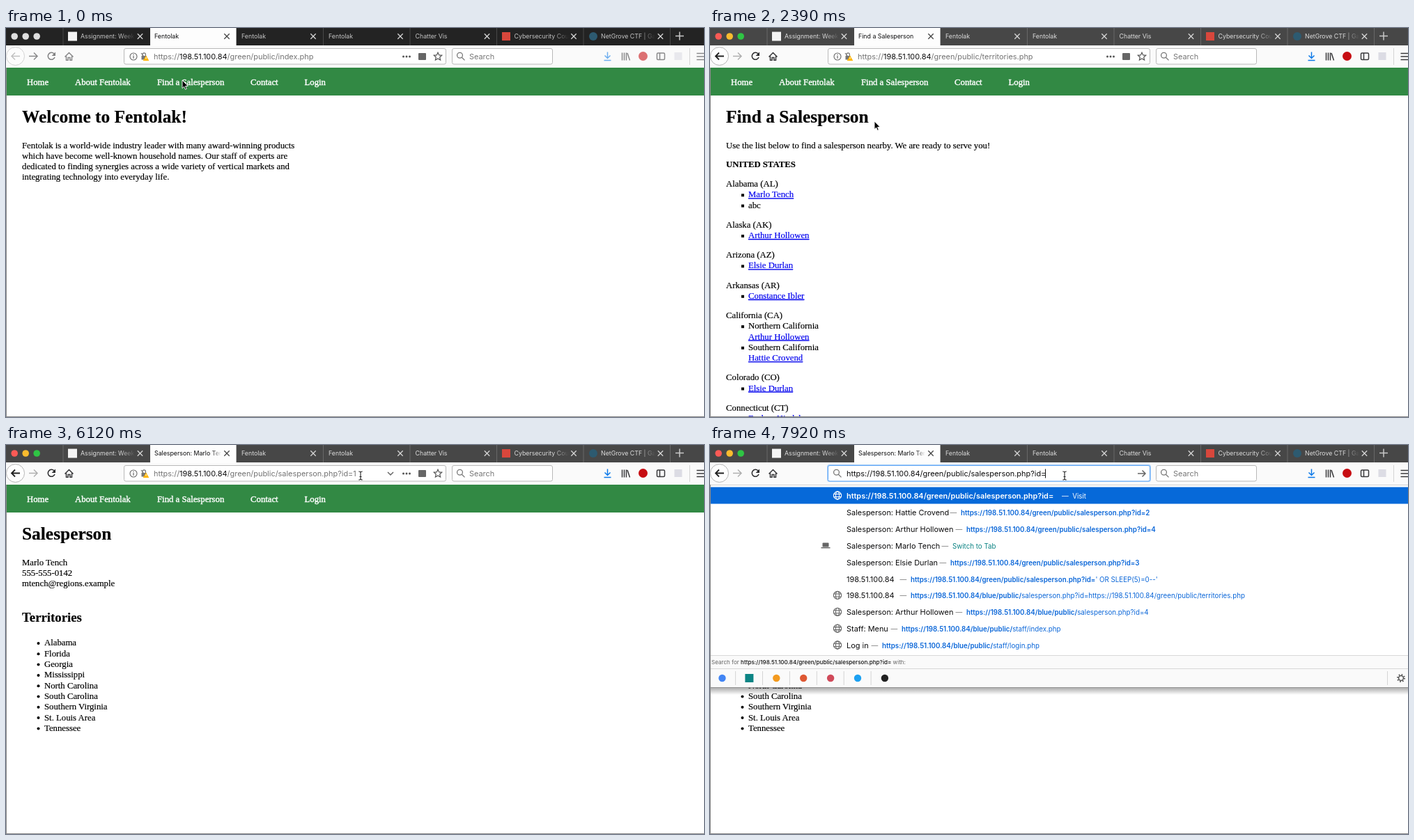
Animation, 1002 px wide and 559 px high, one loop 8000 ms. Source, as an HTML page:

```html
<!DOCTYPE html>
<html lang="en">
<head>
<meta charset="utf-8">
<title>Browser session</title>
<style>
  html, body { margin: 0; width: 100%; height: 100%; overflow: hidden; background: #fff; }
  #stage { display: block; --bar: #474747; --sep: #686868; --tab: #dcdcdc; --path: #737373; }
  #stage.idle { --bar: #232323; --sep: #484848; --tab: #c4c4c4; }
  #stage.focus { --path: #0c0c0d; }
  #stage.idle .tools { opacity: .58; }
  text { white-space: pre; }
  .ui { font-family: Inter, Roboto, sans-serif; }
  .tab { font-size: 8.8px; fill: var(--tab); }
  .on { fill: #0c0c0d; }
  .url { font-size: 10.93px; fill: var(--path); }
  .host { fill: #0c0c0d; }
  .page { font: 12.75px "Liberation Serif", "Times New Roman", serif; }
  .page text { color: #000; fill: currentColor; stroke: currentColor; stroke-width: .18; }
  .page .h1 { font-size: 25.4px; font-weight: bold; }
  .page .h2 { font-size: 18.8px; font-weight: bold; }
  .page .link { color: #00e; text-decoration: underline; }
  .page .nav { color: #fff; stroke-width: .4; }
  .line { fill: none; stroke: #3a3a3c; stroke-width: 1.5; }
  .hit { font-size: 9.75px; fill: #0a66d8; }
  .b { font-weight: 600; }
  .fade stop { stop-color: var(--bar); }
</style>
</head>
<body>
<svg id="stage" width="1002" height="559" viewBox="0 0 1002 559"></svg>
<script>
const LOOP = 8000, STEP = 150;
const ACTIVE = 150, CLICK1 = 1340, LIST = 1790, CLICK2 = 3590, PERSON = 4040,
      HOVER = 5970, FOCUS = 6570, CARET = 7020, PLAIN = 7170, TYPED = 7770;

const BRAND = 'Fentolak', IP = '198.51.100.84';
const SELLER = 'Marlo Tench', SECOND = 'Arthur Hollowen', THIRD = 'Elsie Durlan', FOURTH = 'Hattie Crovend';
const GREEN = `https://${IP}/green/public/`, BLUE = `https://${IP}/blue/public/`;
const QUERY = GREEN + 'salesperson.php?id=';

const text = (x, y, s, cls = '', more = '') => `<text x="${x}" y="${y}" class="${cls}" ${more}>${s}</text>`;
const rect = (x, y, w, h, fill, more = '') => `<rect x="${x}" y="${y}" width="${w}" height="${h}" fill="${fill}" ${more}/>`;
const dot = (x, y, r, fill, more = '') => `<circle cx="${x}" cy="${y}" r="${r}" fill="${fill}" ${more}/>`;
const line = (d, more = '') => `<path d="${d}" class="line" ${more}/>`;
// Shown only while the time lies in one of the [from, to) pairs.
const during = (spans, s) => `<g data-t="${spans}">${s}</g>`;

/* Tab strip */
const cross = (x, color) => line(`M${x - 3.7} 8.3l7.4 7.4m0-7.4l-7.4 7.4`, `style="stroke:${color};stroke-width:1.3"`);
const clipped = (x, w, s) => `<svg x="${x}" y="0" width="${w}" height="25">${s}</svg>`;

function plainTab(x, title, icon) {
  const pad = icon ? 25 : 7.5;
  return clipped(x, 103, text(pad, 15.2, title, 'tab') + rect(82, 0, 21, 25, 'url(#fade)')) +
    rect(x - .5, 0, 1, 25, 'var(--sep)') + (icon || '') + cross(x + 110.5, '#d5d5d5');
}

function liveTab() {
  const title = (x, s) => clipped(207, 102, text(x - 207, 15.2, s, 'tab on') + rect(88, 0, 14, 25, 'url(#fadeOn)'));
  return rect(207, 0, 123.5, 26, '#fdfdfd') +
    during([0, CLICK1], title(213, BRAND)) +
    during([CLICK1, LIST], title(231, BRAND)) +
    during([LIST, CLICK2], title(213, 'Find a Salesperson')) +
    during([CLICK2, PERSON], title(231, 'Find a Salesperson')) +
    during([PERSON, LOOP], title(213, 'Salesperson: ' + SELLER)) +
    during([CLICK1, LIST, CLICK2, PERSON], dot(215, 12, 1.6, '#666', 'id="busy"')) +
    cross(317, '#444');
}

function tabStrip() {
  const lights = colors => colors.map((c, i) => dot(12.2 + 16 * i, 12, 4.8, c)).join('');
  return rect(0, 0, 1002, 25, 'var(--bar)') +
    during([0, ACTIVE], lights(['#dedede', '#dedede', '#dedede'])) +
    during([ACTIVE, LOOP], lights(['#fb5a55', '#f9bb2e', '#2fc544'])) +
    plainTab(82, 'Assignment: Week 10', rect(89, 5.5, 13, 13, '#f4f4f4')) +
    plainTab(330.5, BRAND) + plainTab(455.5, BRAND) + plainTab(580, 'Chatter Vis') +
    plainTab(704.5, 'Cybersecurity Course', rect(712, 6, 12, 12, '#d8473c')) +
    plainTab(829, 'NetGrove CTF | Games', dot(843, 12, 6, '#2d5a70')) +
    rect(953, 0, 1, 25, 'var(--sep)') +
    line('M961 11.5h12m-6-6v12', 'style="stroke:#c8c8c8"') + liveTab();
}

/* Toolbar */
const arrowLeft = 'M20 40.5H8m5-5l-5 5 5 5', arrowRight = 'M33 40.5h12m-5-5l5 5-5 5';
const grey = c => `style="stroke:${c}"`;

function reload() {
  const shape = c => line('M69 37a5 5 0 1 0 1 5', grey(c)) + `<path d="M71 34.6v5.4h-5.4z" fill="${c}"/>`;
  return during([0, 1490, 2390, 3740, 4630, LOOP], shape('#2b2b2d')) +
    during([1490, LIST, 3740, PERSON], line('M60.5 36l9 9m0-9l-9 9')) +
    during([LIST, 2390, PERSON, 4630], shape('#b4b4b4'));
}

function navTools() {
  return '<g class="tools">' +
    dot(13.5, 40.5, 13, '#fefefe', 'stroke="#b5b5b5"') +
    during([0, ACTIVE], line(arrowLeft, grey('#999')) + line(arrowRight)) +
    during([ACTIVE, LOOP], line(arrowLeft, 'style="stroke:#222;stroke-width:1.8"') + line(arrowRight, grey('#b0b0b0'))) +
    reload() + line('M84.5 41.5l6-6 6 6M86.5 40.5V46.3h2.6V42.5h2.8v3.8h2.6v-5.8') +
    line('M863.5 34.5v9m-4-4l4 4 4-4m-9 7h10', grey('#0a78e8')) +
    line('M884.5 35.5v11m3-11v11m3-11v11m1.5-10.5l3.5 10.5') +
    dot(914.5, 40.5, 6.5, '#c70d12') +
    '<rect x="934.5" y="36" width="11" height="9.5" rx="1.5" class="line"/>' + line('M938.5 36v9.5') +
    rect(959.5, 35, 11, 11, '#dcdce4') + line('M991.5 36.5h11m-11 4.5h11m-11 4.5h11') +
    '</g>' + rect(981, 29, 1, 24, '#d4d4d4');
}

const lens = x => `<g fill="none" stroke="#777" stroke-width="1.3"><circle cx="${x - 1.5}" cy="39.3" r="3.9"/><path d="M${x + 1.3} 42.2l4.2 4.2"/></g>`;
const field = (x, w, stroke) => `<rect x="${x}" y="29.5" width="${w}" height="22.5" rx="2.5" fill="#fff" stroke="${stroke}"/>`;

function addressBar() {
  const url = file => text(212, 45, `https://<tspan class="host">${IP}</tspan>/green/public/${file}`, 'url');
  const site = `<circle cx="183" cy="41" r="5" class="line" style="stroke:#666;stroke-width:1.1"/>` +
    rect(182.4, 40, 1.2, 3.8, '#666') + rect(182.4, 37.8, 1.2, 1.3, '#666') +
    rect(194.5, 40, 7, 5.5, '#777') + line('M196 40v-2a2.2 2.2 0 0 1 4.4 0v2m-6.4-4l7 9', 'style="stroke:#777;stroke-width:1.2"') +
    '<path d="M201 39.5l4.3 7.6h-8.6z" fill="#ffb400"/>' + rect(200.5, 42, 1, 2.6, '#fff');
  const actions = [570.5, 575, 579.5].map(x => dot(x, 41, 1.5, '#555')).join('') +
    rect(592, 36, 11, 10, '#666', 'rx="1"') +
    line('M620 35.2l1.7 3.7 4 .4-3 2.7.9 4-3.6-2.1-3.6 2.1.9-4-3-2.7 4-.4z', 'style="stroke:#555;stroke-width:1.2"');
  return during([0, FOCUS], field(169.5, 462, '#b9b9b9')) +
    during([FOCUS, LOOP], rect(168, 28, 465, 25, '#a5cdfa', 'rx="3.5"') + field(169.5, 462, '#62a8f5')) +
    during([FOCUS, CARET], rect(212, 34.5, 291, 13.5, '#b3d6fd')) +
    during([0, TYPED], site + actions) +
    during([0, LIST], url('index.php')) +
    during([LIST, PERSON], url('territories.php')) +
    during([PERSON, TYPED], url('salesperson.php?id=1')) +
    during([HOVER, TYPED], line('M548 39l4 4 4-4', grey('#666'))) +
    during([CARET, PLAIN], rect(502, 35, 1, 13, '#111')) +
    during([TYPED, LOOP], lens(183) + text(196, 45, QUERY, 'url') + line('M614 41h11m-4.5-4.5l4.5 4.5-4.5 4.5', grey('#666'))) +
    during([7920, LOOP], rect(481, 34.5, 1, 13, '#111')) +
    field(640.5, 144, '#b9b9b9') + lens(653) + text(665, 45, 'Search', 'url', 'style="fill:#777"');
}

/* Web pages */
const rows = (x, y, list) => list.map((s, i) => text(x, y + 15.15 * i, s)).join('');

function home() {
  return text(23, 136, `Welcome to ${BRAND}!`, 'h1') + rows(23, 172.6, [
    BRAND + ' is a world-wide industry leader with many award-winning products',
    'which have become well-known household names. Our staff of experts are',
    'dedicated to finding synergies across a wide variety of vertical markets and',
    'integrating technology into everyday life.']);
}

// A leading "*" marks a bullet, "@" a link.
const TERRITORIES = [
  ['Alabama (AL)', '*@' + SELLER, '*abc'],
  ['Alaska (AK)', '*@' + SECOND],
  ['Arizona (AZ)', '*@' + THIRD],
  ['Arkansas (AR)', '*@Constance Ibler'],
  ['California (CA)', '*Northern California', '@' + SECOND, '*Southern California', '@' + FOURTH],
  ['Colorado (CO)', '*@' + THIRD],
  ['Connecticut (CT)', '*@Barlow Hindale']];

function territories() {
  let y = 228, out = text(23, 136, 'Find a Salesperson', 'h1') +
    text(23, 172.6, 'Use the list below to find a salesperson nearby. We are ready to serve you!') +
    text(23, 200.3, 'UNITED STATES', '', 'font-weight="bold"');
  for (const group of TERRITORIES) {
    group.forEach((s, i) => {
      if (s[0] === '*') out += rect(45, y - 5, 4, 4, '#000');
      out += text(i ? 55 : 23, y, s.replace(/^[*@]+/, ''), s.includes('@') ? 'link' : '');
      y += 15.3;
    });
    y += 12.8;
  }
  return out;
}

function person() {
  const areas = ['Alabama', 'Florida', 'Georgia', 'Mississippi', 'North Carolina', 'South Carolina',
    'Southern Virginia', 'St. Louis Area', 'Tennessee'];
  return text(23, 136, 'Salesperson', 'h1') +
    rows(23, 172.6, [SELLER, '555-555-0142', 'mtench@regions.example']) +
    text(23, 254.3, 'Territories', 'h2') +
    areas.map((s, i) => dot(46.5, 285 + 15.3 * i, 2, '#000') + text(55, 288.4 + 15.3 * i, s)).join('');
}

function pages() {
  const menu = [[30, 'Home'], [99, 'About ' + BRAND], [217, 'Find a Salesperson'], [351, 'Contact'], [428.5, 'Login']];
  return '<g class="page">' + rect(0, 57, 1002, 40, '#328944') +
    menu.map(([x, s]) => text(x, 82, s, 'nav')).join('') +
    during([0, LIST], home()) + during([LIST, PERSON], territories()) + during([PERSON, LOOP], person()) +
    '</g>' + rect(0, 57, 1, 502, '#8a8a8a') + rect(0, 558, 1002, 1, '#8a8a8a');
}

/* Address suggestions */
const globe = (y, c) => `<g fill="none" stroke="${c}" stroke-width="1.1"><circle cx="183" cy="${y}" r="5.6"/>` +
  `<ellipse cx="183" cy="${y}" rx="2.5" ry="5.6"/><path d="M177.6 ${y - 2}h10.8m-10.8 4h10.8"/></g>`;

function popup() {
  const hits = [
    ['Salesperson: ' + FOURTH, 360, QUERY + 2],
    ['Salesperson: ' + SECOND, 368, QUERY + 4],
    ['Salesperson: ' + SELLER, 348],
    ['Salesperson: ' + THIRD, 345, QUERY + 3],
    [IP, 288, QUERY, "' OR SLEEP(5)=0--'"],
    [IP, 288, BLUE, `salesperson.php?id=${GREEN}territories.php`],
    ['Salesperson: ' + SECOND, 368, BLUE, 'salesperson.php?id=4'],
    ['Staff: Menu', 275, BLUE, 'staff/index.php'],
    ['Log in', 247, BLUE, 'staff/login.php']];
  let out = rect(1, 348, 1001, 11, 'url(#shade)') + rect(1, 57, 1001, 291, '#fff') + rect(1, 57, 1001, 1, '#d0d0d0') +
    rect(1, 60.5, 1001, 24, '#0669d9') + globe(72.5, '#fff') +
    text(196, 77, QUERY, 'url b', 'style="fill:#fff"') + text(505, 77, '—  Visit', 'hit', 'style="fill:#fff"');
  hits.forEach(([title, x, match, rest = ''], i) => {
    const y = 101.2 + 23.85 * i;
    out += text(196, y, title, 'url') + text(x - 15.5, y, '—', 'hit', 'style="fill:#777"') +
      (match ? text(x, y, `<tspan class="b">${match}</tspan>${rest}`, 'hit')
             : text(x, y, 'Switch to Tab', 'hit', 'style="fill:#0b8383"') +
               rect(161.5, y - 8.5, 9, 6, '#666', 'rx="1"') + rect(159.5, y - 2, 13, 1.5, '#666'));
    if (i > 4) out += globe(y - 4.5, '#666');
  });
  out += rect(1, 302, 1001, 46, '#fafafa') + rect(1, 302, 1001, 1, '#d8d8d8') + rect(1, 321, 1001, 1, '#d8d8d8') +
    text(2, 315, `Search for <tspan fill="#111" font-weight="500">${QUERY}</tspan> with:`, '', 'font-size="8.1" fill="#666"');
  ['#4285f4', '#0c8484', '#f39a1e', '#de5833', '#d04a5a', '#1da1f2', '#222'].forEach((c, i) => {
    const x = 17.5 + 38.9 * i;
    out += i === 1 ? rect(x - 6, 329, 12, 12, c) : dot(x, 335, 5.2, c);
    if (i < 6) out += rect(x + 18.6, 325, 1, 20, '#d4d4d4');
  });
  return out + rect(972, 325, 1, 20, '#d4d4d4') +
    '<circle cx="992" cy="335" r="3.4" class="line" style="stroke:#555"/>' +
    '<circle cx="992" cy="335" r="5" class="line" style="stroke:#555;stroke-dasharray:1.6 2.33;stroke-width:2"/>' +
    rect(1, 348, 1001, 1, '#959595');
}

/* Pointer: time, x, y, shape */
const POINTER = [
  [0, 253, 75, 'arrow'], [150, 253, 76, 'hand'], [1940, 252, 80, 'hand'], [2090, 250, 93, 'hand'],
  [2240, 246, 112, 'arrow'], [2390, 236, 134, 'arrow'], [2540, 190, 180, 'arrow'], [2690, 136, 222, 'arrow'],
  [2840, 98, 248, 'arrow'], [2990, 90, 241, 'hand'], [4040, 92, 241, 'beam'], [4190, 98, 242, 'beam'],
  [4340, 124, 232, 'arrow'], [4490, 162, 214, 'arrow'], [4630, 188, 200, 'arrow'], [5080, 204, 190, 'arrow'],
  [5230, 238, 166, 'arrow'], [5380, 290, 132, 'arrow'], [5530, 352, 98, 'arrow'], [5670, 420, 70, 'arrow'],
  [5820, 472, 53, 'arrow'], [5970, 500, 46, 'beam'], [6120, 509, 44, 'beam']];

const SHAPES = {
  arrow: '<path d="M0 0V11.6L2.6 9.2 4.4 13.3 6.3 12.4 4.5 8.5H8.2Z" fill="#000" stroke="#fff" stroke-width=".9"/>',
  hand: '<path d="M-1.2 1q0-1.2 1.2-1.2t1.2 1.2V5q2-.6 2.4.4 2-.5 2.3.5 1.7-.2 1.8 1V10l-1.4 4H0L-3.4 8.8q-.6-1.4.6-1.6L-1.2 8.4Z" fill="#fff" stroke="#111"/>',
  beam: '<path d="M-2.7-6q2.7 0 2.7 1.5 0-1.5 2.7-1.5M0-5V5M-2.7 6q2.7 0 2.7-1.5 0 1.5 2.7 1.5M-1.5 1.5h3" fill="none" stroke="#222" stroke-width="1.1"/>'
};

const gradient = (id, cls, color, a, b, dir) => `<linearGradient id="${id}" class="${cls}" ${dir}>` +
  `<stop stop-color="${color}" stop-opacity="${a}"/><stop offset="1" stop-color="${color}" stop-opacity="${b}"/></linearGradient>`;

const stage = document.getElementById('stage');
stage.innerHTML = '<defs>' + gradient('fade', 'fade', '#474747', 0, 1, '') +
  gradient('fadeOn', '', '#fdfdfd', 0, 1, '') + gradient('shade', '', '#000', .35, 0, 'x2="0" y2="1"') + '</defs>' +
  rect(0, 0, 1002, 559, '#fff') + pages() +
  '<g class="ui">' + rect(0, 25, 1002, 32, '#fafafa') + tabStrip() + navTools() + addressBar() +
  during([TYPED, LOOP], popup()) + '</g>' +
  Object.entries(SHAPES).map(([k, s]) => `<g id="${k}">${s}</g>`).join('');

const timed = [...stage.querySelectorAll('[data-t]')].map(el => ({ el, at: el.dataset.t.split(',').map(Number) }));
const busy = document.getElementById('busy');
const pointers = Object.keys(SHAPES).map(k => document.getElementById(k));

function draw() {
  const t = performance.now() % LOOP;
  stage.classList.toggle('idle', t < ACTIVE);
  stage.classList.toggle('focus', t >= FOCUS);
  // The number of passed bounds is odd inside a span.
  for (const { el, at } of timed) el.style.display = at.filter(v => v <= t).length % 2 ? '' : 'none';
  const since = t - (t < CLICK2 ? CLICK1 : CLICK2);
  busy.setAttribute('cx', 215 + 4 * Math.max(0, Math.floor(since / STEP)));
  const [, x, y, shape] = POINTER.findLast(p => p[0] <= t);
  for (const p of pointers) {
    p.style.display = p.id === shape ? '' : 'none';
    p.setAttribute('transform', `translate(${x} ${y})`);
  }
  requestAnimationFrame(draw);
}
draw();
</script>
</body>
</html>
```
